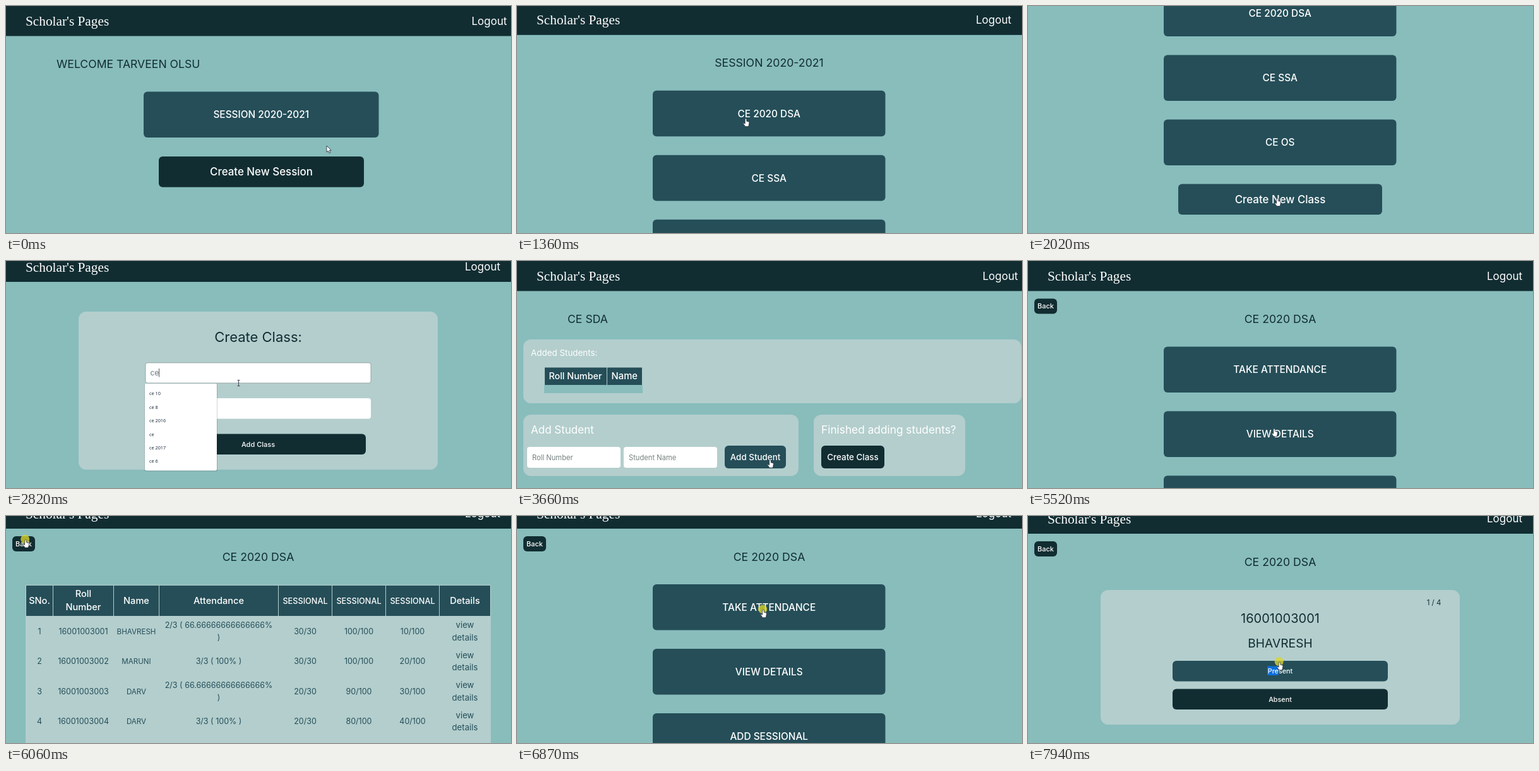
Animation of 800 by 359 pixels, one loop 8000 ms. Source, as an HTML page:

```html
<!DOCTYPE html>
<html lang="en">
<head>
<meta charset="utf-8">
<title>Class register</title>
<style>
html, body { margin: 0; width: 100%; height: 100%; overflow: hidden; background: #88bdbc; }
svg { display: block; width: 100vw; height: 100vh; font-family: Inter, sans-serif; }
text { white-space: pre; }
</style>
</head>
<body>
<svg id="stage" viewBox="0 0 800 359"></svg>
<script>
const stage = document.getElementById('stage');
const LOOP = 8000, MID = 399.5;
const DARK = '#112d32', TEAL = '#254e58', BG = '#88bdbc', PANEL = '#b3cecd', WHITE = '#fff';

// Redraw moments: [first, last, count]
const STEPS = [
  [0, 0, 1], [120, 240, 2], [380, 1160, 8], [1260, 1360, 2], [1460, 2020, 6],
  [2110, 2540, 5], [2680, 2820, 2], [2910, 3000, 2], [3140, 3550, 5], [3660, 3660, 1],
  [3790, 3900, 2], [4010, 4800, 8], [4890, 5000, 2], [5110, 5640, 6], [5750, 5950, 3],
  [6060, 6150, 2], [6260, 6480, 3], [6600, 7300, 8], [7430, 7850, 5], [7940, 7940, 1]
];
const TICKS = STEPS.flatMap(([a, b, n]) =>
  Array.from({ length: n }, (_, i) => n > 1 ? a + (b - a) * i / (n - 1) : a));

const SCENES = [
  [0, 'home'], [1100, 'blank'], [1260, 'session'], [2200, 'blank'], [2320, 'form'],
  [3340, 'blank'], [3440, 'students'], [4780, 'blank'], [4890, 'session'], [5110, 'blank'],
  [5200, 'menu'], [5750, 'blank'], [5840, 'details'], [6150, 'blank'], [6260, 'menu'],
  [6890, 'roll']
];
const SCROLL = [
  [0, 0], [1260, 0], [1360, 1.7], [1460, 8], [2000, 160], [2110, 160], [2111, 0],
  [2325, 0], [2430, 14.5], [3300, 14.5], [3301, 0], [5850, 0], [5950, 27.5],
  [6100, 27.5], [6101, 0], [6260, 0], [6470, 27.5], [7330, 27.5], [7640, 19.5]
];
// Pointer path: time, x, y, shape
const POINTER = [
  [0, 508, 221, 'arrow'], [120, 490, 206, 'hand'], [240, 468, 188, 'hand'],
  [800, 405, 177, 'hand'], [1100, 402, 177, 'arrow'], [1260, 375, 178, 'hand'],
  [1360, 362.5, 178, 'hand'], [1460, 363, 180, 'hand'], [2020, 395, 304, 'hand'],
  [2200, 395, 300, 'arrow'], [2430, 372, 215, 'arrow'], [2540, 368.5, 193, 'beam'],
  [3000, 368.5, 193, 'beam'], [3140, 400, 290, 'hand'], [3300, 400, 292, 'arrow'],
  [3550, 402, 312, 'arrow'], [3660, 401, 314.5, 'hand'], [3790, 250, 312, 'beam'],
  [3900, 100, 311, 'beam'], [4123, 100, 311, 'beam'], [4236, 250, 311, 'beam'],
  [4349, 250, 311, 'beam'], [4461, 385, 312, 'hand'], [4574, 420, 318, 'arrow'],
  [4687, 530, 336, 'hand'], [4800, 520, 320, 'arrow'], [4890, 430, 200, 'hand'],
  [5000, 384, 175.5, 'hand'], [5110, 384, 180, 'arrow'], [5216, 386, 195, 'hand'],
  [5428, 390, 265, 'hand'], [5640, 390, 272, 'hand'], [5750, 330, 230, 'arrow'],
  [5850, 150, 110, 'arrow'], [5950, 40, 48, 'hand'], [6060, 31, 37.5, 'hand'],
  [6150, 33, 42, 'arrow'], [6260, 90, 75, 'arrow'], [6480, 330, 135, 'hand'],
  [6700, 390, 146, 'hand'], [6890, 390, 150, 'arrow'], [7300, 398, 212, 'arrow'],
  [7500, 398.5, 230, 'hand'], [7940, 398.5, 231, 'hand']
];
const CLICKS = [
  [930, 1070], [2110, 2190], [2680, 2800], [3240, 3300], [4010, 4100], [4236, 4300],
  [4461, 4560], [4687, 4780], [5000, 5100], [5640, 5740], [6060, 6140], [6780, 6880], [7850, 8000]
];

const lastBefore = (keys, t) => keys.reduce((hit, k, i) => k[0] <= t ? i : hit, 0);
function track(keys, t, col = 1) {
  const i = lastBefore(keys, t), a = keys[i], b = keys[i + 1];
  return b ? a[col] + (b[col] - a[col]) * (t - a[0]) / (b[0] - a[0]) : a[col];
}

const box = (x1, y1, x2, y2, fill, r = 0, extra = '') =>
  `<rect x="${x1}" y="${y1}" width="${x2 - x1}" height="${y2 - y1}" rx="${r}" fill="${fill}" ${extra}/>`;
const text = (s, x, y, size, fill = WHITE, extra = '') =>
  `<text x="${x}" y="${y}" font-size="${size}" fill="${fill}" ${extra}>${s}</text>`;
const mid = (s, x, y, size, fill, weight = 400) =>
  text(s, x, y, size, fill, `text-anchor="middle" font-weight="${weight}"`);
const line = (x1, y1, x2, y2, color, w = 1) =>
  `<path d="M${x1} ${y1}L${x2} ${y2}" stroke="${color}" stroke-width="${w}"/>`;
const button = (x1, y1, x2, y2, label, size, fill = DARK) =>
  box(x1, y1, x2, y2, fill, 6) + mid(label, (x1 + x2) / 2, (y1 + y2) / 2 + size * .36, size, WHITE, 500);
const heading = s => mid(s, MID, 98, 17.7, DARK);
const stack = labels => labels.map((s, i) =>
  button(215, 135.5 + 102 * i, 583.5, 208 + 102 * i, s, 15.4, TEAL)).join('');
const back = () => button(10, 59.5, 46, 83.5, 'Back', 11);

function header(narrow) {
  return box(0, -1, 800, 47.5, DARK)
    + text("Scholar's Pages", 31, 31, 21.3, WHITE, 'font-family="Liberation Serif, serif"')
    + text('Logout', narrow ? 727 : 737.5, 29.5, 17);
}

function field(x1, y1, x2, y2, value, hint = '') {
  return box(x1, y1, x2, y2, WHITE, 4)
    + text(value || hint, x1 + 8, (y1 + y2) / 2 + 4, 11.2, value ? TEAL : '#75807f');
}

function dropdown() {
  return box(219.5, 209, 334.8, 347, '#000', 2, 'opacity=".22"')
    + box(220, 208.5, 334, 346, WHITE, 2)
    + ['ce 10', 'ce 8', 'ce 2016', 'ce', 'ce 2017', 'ce 6'].map((s, i) =>
      text(s, 227, 226.8 + 21.4 * i, 7.3, '#123', 'font-family="Open Sans, sans-serif"')).join('');
}

const PUPILS = [
  ['16001003001', 'BHAVRESH', 2, '30/30', '100/100', '10/100'],
  ['16001003002', 'MARUNI', 3, '30/30', '100/100', '20/100'],
  ['16001003003', 'DARV', 2, '20/30', '90/100', '30/100'],
  ['16001003004', 'DARV', 3, '20/30', '80/100', '40/100']
];
const COLS = [31.5, 74.5, 170.5, 242.5, 431.5, 516.5, 601.5, 686.5, 767.5];
const colMid = i => (COLS[i] + COLS[i + 1]) / 2;

function table() {
  const top = 136.5, body = 185.5;
  let out = box(31, top, 768, 390, PANEL) + box(31, top, 768, body, TEAL);
  ['SNo.', 'Roll|Number', 'Name', 'Attendance', 'SESSIONAL', 'SESSIONAL', 'SESSIONAL', 'Details']
    .forEach((s, i) => s.split('|').forEach((part, k, all) => {
      const y = all.length > 1 ? 155.8 + 20.8 * k : 166;
      out += mid(part, colMid(i), y, part === 'SESSIONAL' ? 12.7 : 14.6, WHITE, 500);
    }));
  COLS.forEach(x => out += line(x, top, x, body, PANEL));
  out += line(31, top + .5, 768, top + .5, PANEL);
  PUPILS.forEach(([id, name, days, ...marks], r) => {
    const y = 214.2 + 47.5 * r;
    const put = (s, c, dy = 0, size = 12.5) => out += mid(s, colMid(c), y + dy, size, TEAL);
    put(r + 1, 0);
    put(id, 1);
    put(name, 2, 0, 11.6);
    if (days === 3) put('3/3 ( 100% )', 3);
    else {
      put('2/3 ( 66.66666666666666%', 3, -9.7);
      put(')', 3, 9.7);
    }
    marks.forEach((m, i) => put(m, 4 + i));
    put('view', 7, -9.5, 13.2);
    put('details', 7, 9.8, 13.2);
  });
  return out;
}

const PAGES = {
  blank: () => '',
  home: () => text('WELCOME TARVEEN OLSU', 80, 98, 17.6, DARK)
    + button(218, 135.5, 590.5, 208, 'SESSION 2020-2021', 15.4, TEAL)
    + button(242, 238, 567, 286.5, 'Create New Session', 16.9),
  session: t => heading('SESSION 2020-2021') + stack(['CE 2020 DSA', 'CE SSA', 'CE OS'])
    + button(238, 441.5, 561, 490, 'Create New Class', 16.9, t > 1900 && t < 2300 ? TEAL : DARK),
  form(t) {
    const typed = t < 2820 ? '' : t < 2910 ? 'ce' : t < 3000 ? 'ce s' : 'ce sda';
    const focus = t >= 2820 && t < 3140;
    const caret = { 'ce': 242.5, 'ce s': 253, 'ce sda': 267 }[typed];
    return box(115, 94.5, 684, 344.5, PANEL, 12)
      + mid('Create Class:', MID, 142, 22, DARK)
      + box(221, 175.5, 578, 207.5, WHITE, 3, focus ? 'stroke="#8a9898" stroke-width=".8"' : '')
      + text(typed, 228.5, 195.5, 12, '#6c7a80')
      + (focus ? line(caret, 184.5, caret, 198, '#333', .8) : '')
      + box(221, 231.5, 578, 264, WHITE, 4)
      + button(229, 288, 570, 320.5, 'Add Class', 11, t >= 3140 ? TEAL : DARK)
      + (t >= 2820 && t < 3000 ? dropdown() : '');
  },
  students(t) {
    const added = t >= 4570, dy = added ? 28 : 0, edge = added ? 789 : 799;
    const hover = (t >= 3650 && t < 3780) || (t >= 4461 && t < 4570);
    const id = t >= 4120 && !added ? PUPILS[0][0] : '';
    const name = t >= 4340 && !added ? PUPILS[0][1] : '';
    return text('CE SDA', 80, 98, 17.6, DARK)
      + box(10, 124, edge, 225 + dy, PANEL, 12)
      + text('Added Students:', 22, 150, 13.4)
      + box(43, 168, 199, 209 + dy, BG) + box(43, 168, 199, 196, TEAL)
      + [43.5, 142.5, 198.5].map(x => line(x, 168, x, 196, PANEL)).join('')
      + line(43, 168, 199, 168, PANEL)
      + mid('Roll Number', 92.5, 187.3, 14.4, WHITE, 500) + mid('Name', 170.3, 187.3, 14.8, WHITE, 500)
      + (added ? mid(PUPILS[0][0], 92.5, 214, 12.5, TEAL) + mid(PUPILS[0][1], 170.5, 214, 9.5, TEAL) : '')
      + `<g transform="translate(0 ${dy})">`
      + box(10, 243, 446, 340, PANEL, 12) + text('Add Student', 22, 273, 17)
      + field(16, 294, 164, 327, id, 'Roll Number')
      + field(169, 294, 317, 327, name, 'Student Name')
      + button(329, 292, 426, 328, 'Add Student', 13.4, hover ? TEAL : DARK)
      + box(470, 243, 710, 340, PANEL, 12) + text('Finished adding students?', 482, 273, 17.3)
      + button(482, 292, 582, 328, 'Create Class', 13.4, t > 4680 ? TEAL : DARK) + '</g>';
  },
  menu: () => back() + heading('CE 2020 DSA')
    + stack(['TAKE ATTENDANCE', 'VIEW DETAILS', 'ADD SESSIONAL']),
  details: () => back() + heading('CE 2020 DSA') + table(),
  roll(t) {
    const marked = t >= 7800;
    return back() + heading('CE 2020 DSA') + box(115, 136.5, 684, 349.5, PANEL, 12)
      + mid('1 / 4', 643, 160.5, 11.5, DARK)
      + mid(PUPILS[0][0], MID, 188.5, 20, DARK)
      + mid(PUPILS[0][1], MID, 227.3, 19.2, DARK)
      + box(229, 248.5, 570, 281, t >= 7500 ? TEAL : DARK, 6)
      + (marked ? box(379, 257, 396.5, 271.5, '#0b6fdc') : '')
      + mid('Present', MID, 268.8, 10.8, WHITE, 500)
      + button(229, 293, 570, 325.5, 'Absent', 10.8);
  }
};

const SHAPES = {
  arrow: '<path d="M0 0V10.2L2.4 8 4.1 11.8 5.9 11 4.2 7.3H7.2Z" fill="#fff" stroke="#223" stroke-width=".8"/>',
  hand: '<path d="M-1.3 .8Q0-.8 1.3 .8V4.2L4.6 5Q5.7 5.4 5.4 6.8L4.7 10.6 4.2 12.6H-.8L-4.2 8Q-4 6.4-1.3 8.2Z" fill="#fff" stroke="#223" stroke-width=".7"/>',
  beam: '<path d="M-2-4.5H2M0-4.5V4.5M-2 4.5H2" fill="none" stroke="#334" stroke-width=".9"/>'
};

function pointer(t) {
  const x = track(POINTER, t), y = track(POINTER, t, 2);
  const kind = POINTER[lastBefore(POINTER, t)][3];
  const halo = CLICKS.some(([a, b]) => t >= a && t < b);
  return `<g transform="translate(${x} ${y})">`
    + (halo ? '<circle cx="-.8" cy="-.7" r="7" fill="#dcd62c" opacity=".78"/>' : '')
    + SHAPES[kind] + '</g>';
}

function draw(t) {
  const scene = SCENES[lastBefore(SCENES, t)][1];
  const wide = scene === 'home' || scene === 'blank' || (scene === 'students' && t < 4570);
  stage.innerHTML = box(0, 0, 800, 359, BG)
    + `<g transform="translate(0 ${-track(SCROLL, t)})">${header(!wide)}${PAGES[scene](t)}</g>`
    + pointer(t);
}

let shown = -1;
function tick() {
  const now = performance.now() % LOOP;
  const t = TICKS.findLast(s => s <= now + 1);
  if (t !== shown) draw(shown = t);
  requestAnimationFrame(tick);
}
tick();
</script>
</body>
</html>
```
